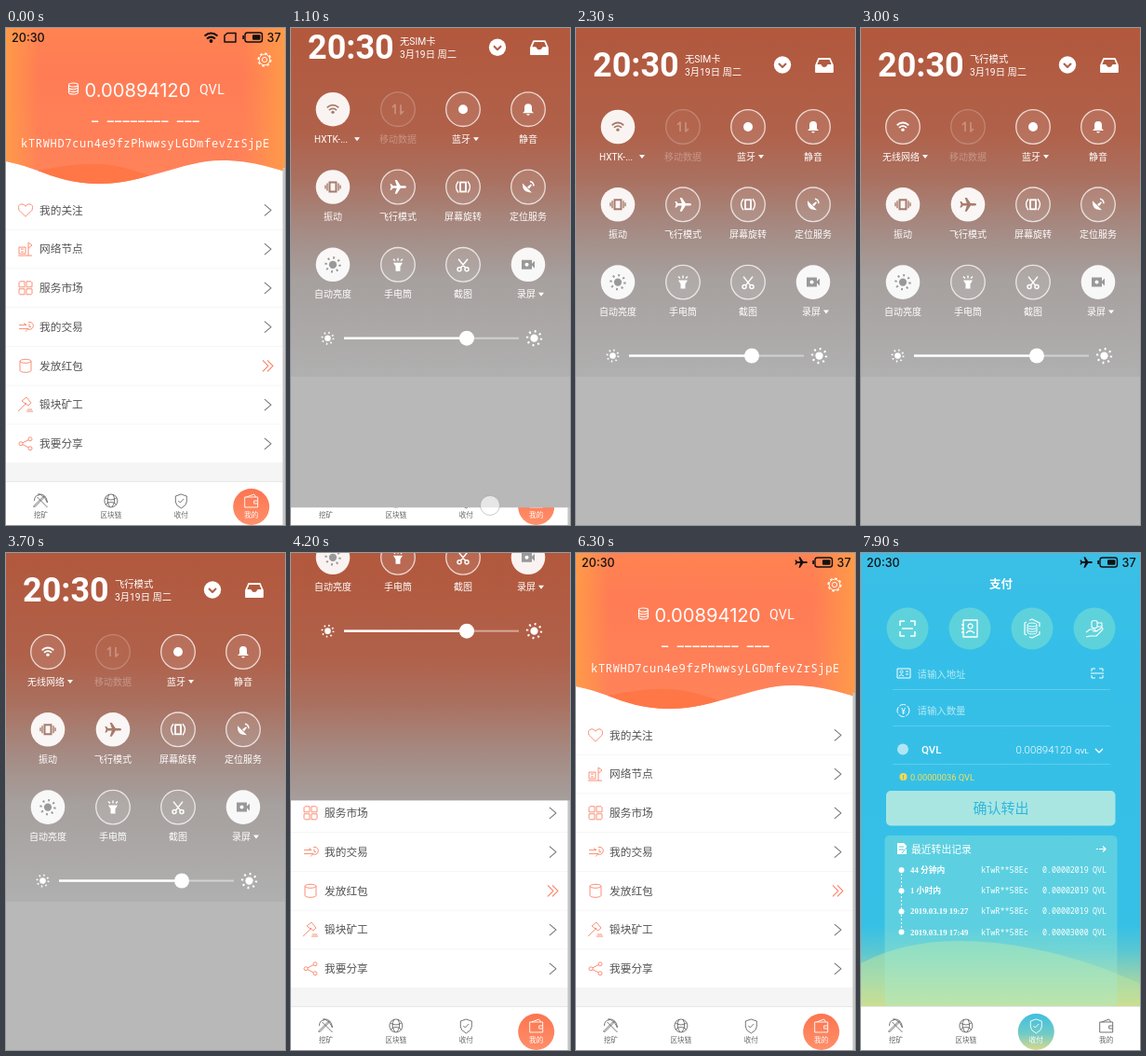
Write an HTML page that moves like this. It is 300x533 px and loops after 8 s.

```html
<!DOCTYPE html>
<html lang="zh-CN">
<head>
<meta charset="utf-8">
<style>
html, body { margin: 0; width: 100%; height: 100%; overflow: hidden; background: #fff; }
svg { display: block; width: 300px; height: 533px; font-family: Roboto, "Noto Sans CJK SC", "Noto Sans CJK", sans-serif; }
.mono { font-family: "Noto Sans Mono", "Liberation Mono", monospace; }
.serif { font-family: "Liberation Serif", "Noto Sans CJK SC", serif; }
.wide { font-family: Inter, Roboto, sans-serif; }
</style>
</head>
<body>
<svg id="stage" viewBox="0 0 300 533"></svg>
<script>
const LOOP = 8000, PLANE_ON = 2900, SHOW_PAY = 7000;
const COIN = 'QVL', ADDRESS = 'kTRWHD7cun4e9fzPhwwsyLGDmfevZrSjpE', WIFI = 'HXTK-...';

// Drawing helpers
const text = (s, x, y, size, fill = '#fff', more = '') =>
  `<text x="${x}" y="${y}" font-size="${size}" fill="${fill}" ${more}>${s}</text>`;
const middle = (s, x, y, size, fill, more = '') => text(s, x, y, size, fill, `text-anchor="middle" ${more}`);
const rect = (x, y, w, h, fill, more = '') =>
  `<rect x="${x}" y="${y}" width="${w}" height="${h}" fill="${fill}" ${more}/>`;
const circle = (x, y, r, fill, more = '') => `<circle cx="${x}" cy="${y}" r="${r}" fill="${fill}" ${more}/>`;
const line = (d, x, y, color, width = 1, more = '') =>
  `<path d="${d}" transform="translate(${x} ${y})" fill="none" stroke="${color}" stroke-width="${width}" stroke-linejoin="round" ${more}/>`;
const solid = (d, x, y, color, scale = 1) =>
  `<path d="${d}" transform="translate(${x} ${y}) scale(${scale})" fill="${color}"/>`;
const gradient = (id, stops, dir = 'x2="0" y2="1"') => `<linearGradient id="${id}" ${dir}>` +
  stops.map(([at, c]) => `<stop offset="${at}" stop-color="${c}"/>`).join('') + '</linearGradient>';

const ICON = {
  plane: 'M11 0Q11-1.6 8.5-1.6H3.5L-1.5-9H-4L-1.5-1.6H-6.5L-8.5-4H-10.5L-9 0-10.5 4H-8.5L-6.5 1.6H-1.5L-4 9H-1.5L3.5 1.6H8.5Q11 1.6 11 0Z',
  scan: 'M-6-2V-5H-2M2-5H6V-2M6 2V5H2M-2 5H-6V2M-7 0H7',
  bigScan: 'M-8-3V-8H-3M3-8H8V-3M8 3V8H3M-3 8H-8V3M-6 0H6',
  contact: 'M-7-9H8V9H-7ZM-9-4H-6M-9 0H-6M-9 4H-6M-4 5Q0 0 5 5M0.5-5a2.5 2.5 0 1 0 .1 0',
  shield: 'M0-7L6-5V1Q6 5 0 8Q-6 5-6 1V-5ZM-3 0L-1 2 3-2',
  pick: 'M-8 6L3-5L4-4L-7 7ZM-3-7Q6-8 7 2Q5-3 2-5Q0-7-3-7ZM7 7L-4-4M-7 0Q-7-6-2-6',
  globe: 'M7 0A7 7 0 1 1-7 0A7 7 0 1 1 7 0M-6-3Q0 1 6-3M-6 4Q0-1 6 4M-2-7Q-6 0-1 7M2-7Q6 0 1 7',
  wallet: 'M-7-4H7V7H-7ZM-5-4L3-7 5-4M7 0H3V3H7',
  stack: 'M-5-4A5 2 0 0 1 5-4A5 2 0 0 1-5-4V4A5 2 0 0 0 5 4V-4M-5-1.3A5 2 0 0 0 5-1.3M-5 1.4A5 2 0 0 0 5 1.4'
};

const wifi = (x, y, color, s = 1) => `<g transform="translate(${x} ${y}) scale(${s})">` +
  line('M-7-2Q0-8 7-2M-4.5 1Q0-2.8 4.5 1', 0, 0, color, 2) + circle(0, 3.5, 1.9, color) + '</g>';
const sun = (x, y, r, color) => circle(x, y, r * .55, color) +
  circle(x, y, r, 'none', `stroke="${color}" stroke-width="${r * .32}" stroke-dasharray="${r * .25} ${r * .535}"`);

function statusBar() {
  const bold = 'class="wide" font-weight="500"';
  return text('20:30', 6, 15, 12.6, '#111', bold) +
    `<g class="before">${wifi(220.5, 10.5, '#111')}${line('M-6 5V-2L-3-4.5H6V5Z', 241, 10, '#111', 1.5)}</g>` +
    `<g class="after">${solid(ICON.plane, 242, 10, '#111', .63)}</g>` +
    rect(257, 5, 18.5, 10, 'none', 'rx="2.5" stroke="#111" stroke-width="1.4"') +
    rect(265, 7.2, 8.5, 5.6, '#111', 'rx="1"') + rect(254.3, 8, 1.7, 4, '#111') +
    text('37', 280.5, 15, 12.6, '#111', bold);
}

function tabBar(active) {
  const tabs = [['pick', '挖矿'], ['globe', '区块链'], ['shield', '收付'], ['wallet', '我的']];
  return rect(0, 486, 300, 47, '#fff') + rect(0, 486, 300, .7, '#ddd') + tabs.map(([icon, label], i) => {
    const x = 37.5 + 75.4 * i, on = i === active, color = on ? '#fff' : '#666';
    return (on ? circle(x, 513.5, 19.5, `url(#tab${i})`) : '') +
      line(ICON[icon], x, 507, color, .9) + middle(label, x, 525, 7.6, color);
  }).join('');
}

function minePage() {
  const orange = '#f98468';
  const rows = [
    ['我的关注', 'M0 7L-7 0Q-9-6-4-6.5Q-1-6.5 0-4Q1-6.5 4-6.5Q9-6 7 0Z'],
    ['网络节点', 'M-7-2H0V5H-7ZM-5 0H-2M-5 3H-2M3 7V-7L7-4 3-1M-8 7H7'],
    ['服务市场', 'M-6-7H-1V-1H-7V-6ZM1-7H6L7-6V-1H1ZM-7 1H-1V7H-6L-7 6ZM1 1H7V6L6 7H1Z'],
    ['我的交易', 'M-7-2H1L-2-4M-7 2H3L0 5M3-5A4 4 0 1 1 2 2M4-3V0H6'],
    ['发放红包', 'M-6-5A6 2 0 0 1 6-5V5A6 2 0 0 1-6 5ZM-6-5A6 2 0 0 0 6-5'],
    ['锻块矿工', 'M-8 7L1-2M-4-4L1-8 6-2 3 1ZM1 7H8M2 5H7'],
    ['我要分享', 'M-3-1L3-4M-3 1L3 4M-7 0a2 2 0 1 0 4 0a2 2 0 1 0-4 0M3-5a2 2 0 1 0 4 0a2 2 0 1 0-4 0M3 5a2 2 0 1 0 4 0a2 2 0 1 0-4 0']
  ];
  const list = rows.map(([label, icon], i) => {
    const y = 195.3 + 41.75 * i, hot = i === 4;
    return line(icon, 21, y, orange, .9) + text(label, 36, y + 4.3, 11.7, '#555') +
      line(hot ? 'M-3-6L3 0-3 6M2-6L8 0 2 6' : 'M-3-6L4 0-3 6', hot ? 279 : 281, y, hot ? orange : '#777', 1.1) +
      rect(0, y + 20.5, 298, .7, '#f2f2f2');
  }).join('');
  const cog = circle(0, 0, 5.8, 'none', 'stroke="#fff" stroke-width=".9"') +
    circle(0, 0, 6.9, 'none', 'stroke="#fff" stroke-width="1.3" stroke-dasharray="2.7 2.72"') +
    circle(0, 0, 2.6, 'none', 'stroke="#fff" stroke-width=".9"');
  const wave = 'M0 0H300V154C280 148 260 142 232 142C190 142 150 167 100 167C60 167 35 150 0 143Z';
  return rect(0, 0, 300, 533, '#fff') +
    `<path d="${wave}" fill="url(#mineSky)"/><path d="${wave}" fill="url(#mineEdge)"/>` +
    '<path d="M34 153C60 148 80 145 100 146C122 147 138 153 154 158C136 164 118 167 100 167C72 167 52 160 34 153Z" fill="#ff7746"/>' +
    statusBar() + `<g transform="translate(278 34)">${cog}</g>` +
    line(ICON.stack, 72.5, 65, '#fff', 1.1) +
    text('0.00894120', 84.5, 74, 20.2, '#fff', 'class="wide"') +
    text(COIN, 208, 71, 14, '#fff', 'letter-spacing=".4"') +
    text('_ ________ ___', 92, 99, 12, '#fff', 'class="mono" letter-spacing="1.15" font-weight="600"') +
    text(ADDRESS, 16, 127.5, 12, '#fff', 'class="mono" letter-spacing=".68" font-weight="300"') +
    list + rect(0, 466, 300, 20, '#f5f5f5') + tabBar(3) + rect(297.5, 150, 2.5, 383, '#c4c4c4');
}

function payPage() {
  const pale = '#b4ebf4';
  const circles = [
    line(ICON.bigScan, 50, 81, '#fff', 1.5),
    line(ICON.contact, 117, 81, '#fff', 1.3),
    line('M-3-9L0-10 8-6V-2M8 3V6L0 10-3 9M-6 7L-8 6V-6L-6-7', 184, 81, '#fff', 1.2) + line(ICON.stack, 184, 81, '#fff', .9),
    line('M-9 4L-5 1H0L2 3H-2M2 3L8-1Q10 0 8 2L2 8H-5L-9 9M-3-2a3 1.5 0 1 0 6 0v-5a3 1.5 0 1 0-6 0zM3-2h5v-4h-5', 251, 81, '#fff', 1.1)
  ].map((icon, i) => circle(50 + 67 * i, 81, 22.5, '#86e6cf', 'fill-opacity=".5"') + icon).join('');
  const history = [
    ['44 分钟内', '0.00002019'], ['1 小时内', '0.00002019'],
    ['2019.03.19 19:27', '0.00002019'], ['2019.03.19 17:49', '0.00003000']
  ].map(([when, amount], i) => {
    const y = 340 + 22.2 * i;
    return circle(43.5, y, 3, '#fff') + text(when, 53, y + 3, 8.8, '#fff', 'class="serif" font-weight="700"') +
      text('kTwR**58Ec', 129, y + 3, 8.5, '#fff', 'class="mono" font-weight="300"') +
      text(amount, 195, y + 3, 8.3, '#fff', 'class="mono" font-weight="300"') +
      text(COIN, 249, y + 3, 8.3, '#fff', 'class="mono"');
  }).join('');
  const rule = y => rect(34, y, 234, .8, '#fff', 'fill-opacity=".25"');
  return rect(0, 0, 300, 533, 'url(#paySky)') +
    '<path d="M0 440C30 424 65 416 105 416C175 416 250 438 300 462V490H0Z" fill="url(#hill)"/>' +
    statusBar() + middle('支付', 150.5, 37.5, 12.5, '#fff', 'font-weight="700"') + circles +
    rule(146) + rule(185) + rule(226) +
    line('M-7-5H7V5H-7ZM2-2H5M2 1H5M-5 3Q-3 0 0 3M-2.5-3a1.5 1.5 0 1 0 .1 0', 46, 129, '#fff') +
    text('请输入地址', 60.5, 133.5, 10.4, pale) + line(ICON.scan, 254, 129, '#fff', 1) +
    circle(45.5, 169, 6.5, 'none', 'stroke="#fff" stroke-dasharray="7 1.5"') + middle('¥', 45.5, 172.5, 9, '#fff') +
    text('请输入数量', 60.5, 173, 10.4, pale) +
    circle(45, 210.5, 6, '#fff', 'fill-opacity=".6"') + text(COIN, 65, 214.5, 11.5, '#fff', 'font-weight="500"') +
    text('0.00894120', 166.5, 215, 11.5, '#fff', 'font-weight="300"') + text(COIN, 230, 215, 8) +
    line('M-4-2L0 2 4-2', 256, 212, '#fff', 1.3) +
    circle(45.5, 240, 4, '#f5d94f') + middle('!', 45.5, 242.5, 7, '#4bbfd0', 'font-weight="700"') +
    text('0.00000036 ' + COIN, 53, 243.5, 9.3, '#f5e05a') +
    rect(27, 255, 246.5, 37.5, '#a9e6e2', 'rx="5"') + middle('确认转出', 150.5, 278.5, 15, '#2fb6dc') +
    rect(25.5, 303, 250, 183, '#a5ecd6', 'fill-opacity=".34" rx="5"') +
    solid('M-5-6H2L5-3V6H-5Z', 44, 317, '#fff') + line('M-3-2H2M-3 1H2M0 5L5-1', 44, 317, '#58c6dc') +
    text('最近转出记录', 54, 321.5, 10.8, '#fff', 'font-weight="500"') +
    line('M-5 0H-3M-2 0H5M2-3L5 0 2 3', 258, 317.5, '#fff', 1.2) +
    line('M0 0V67', 43.5, 340, '#fff', 1, 'stroke-dasharray="2 2"') + history + tabBar(2);
}

function panelContent() {
  const dark = '#a77b6c';
  const glyphs = {
    wifi: c => wifi(0, 0, c, .9),
    data: c => line('M-3 5V-5L-6-2M3-5V5L6 2', 0, 0, c, 1.7),
    dot: c => circle(0, 0, 5, c),
    bell: c => solid('M-6 4L-4 2V-2Q-4-6 0-6Q4-6 4-2V2L6 4ZM-2 5H2Q0 8-2 5Z', 0, 0, c),
    shake: c => rect(-3.5, -5, 7, 10, 'none', `stroke="${c}" stroke-width="2"`) + line('M-6-4V4M6-4V4M-8-2V2M8-2V2', 0, 0, c, 1.4),
    plane: c => solid(ICON.plane, 0, 0, c, .82),
    rotate: c => rect(-3, -5, 6, 10, 'none', `stroke="${c}" stroke-width="1.8"`) + line('M-5-6Q-10 0-5 6M5-6Q10 0 5 6', 0, 0, c, 1.4),
    dish: c => solid('M-6-4Q-7 6 4 6ZM-1 0L3-3 4-2 1 2Z', 0, 0, c) + line('M2-6Q6-5 6-1', 0, 0, c, 1.5),
    sun: c => sun(0, 0, 7.5, c),
    torch: c => solid('M-5-2H5L2.5 2V7H-2.5V2Z', 0, 0, c) + line('M0-7V-4M-5-6L-3-4M5-6L3-4', 0, 0, c, 1.4),
    cut: c => line('M-5-6L3 4M5-6L-3 4M-6 5a2 2 0 1 0 4 0a2 2 0 1 0-4 0M2 5a2 2 0 1 0 4 0a2 2 0 1 0-4 0', 0, 0, c, 1.5),
    film: c => solid('M-7-5H4V-1L7-4V4L4 1V5H-7Z', 0, 0, c) + circle(-1.5, 0, 2, '#fff')
  };
  const tile = (col, row, glyph, label, on, arrow) => {
    const x = 45 + 70 * col, y = 106 + 83.3 * row, off = glyph === 'data';
    const tint = row === 2 ? '#999' : dark;
    return `<g transform="translate(${x} ${y})" ${off ? 'opacity=".3"' : ''}>` +
      circle(0, 0, 18.3, '#fff', on ? 'fill-opacity=".93"' : 'fill-opacity=".1" stroke="#fff" stroke-opacity=".75" stroke-width="1.3"') +
      glyphs[glyph](on ? tint : '#fff') +
      middle(label, arrow ? -2 : 0, 35.5, 10, '#fff') +
      (arrow ? solid('M-3-2H3L0 2Z', arrow, 32, '#fff') : '') + '</g>';
  };
  return text('20:30', 18, 52, 36, '#fff', 'font-weight="700"') +
    `<g class="before">${text('无SIM卡', 117, 37, 10.3)}${tile(0, 0, 'wifi', WIFI, true, 26)}${tile(1, 1, 'plane', '飞行模式', false)}</g>` +
    `<g class="after">${text('飞行模式', 117, 37, 10.3)}${tile(0, 0, 'wifi', '无线网络', false, 24)}${tile(1, 1, 'plane', '飞行模式', true)}</g>` +
    text('3月19日 周二', 117, 51, 10.3) +
    circle(222, 39.5, 9.2, '#fff') + line('M-4-2L0 2 4-2', 222, 40, '#ac604a', 2) +
    line('M-9 0L-6-7H6L9 0V7H-9ZM-9 0H-4Q-3 3 0 3Q3 3 4 0H9', 267, 40, '#fff', 1.8) +
    solid('M-9 0H-4Q-3 3 0 3Q3 3 4 0H9V7H-9Z', 267, 40, '#fff') +
    tile(1, 0, 'data', '移动数据') + tile(2, 0, 'dot', '蓝牙', false, 14) + tile(3, 0, 'bell', '静音') +
    tile(0, 1, 'shake', '振动', true) + tile(2, 1, 'rotate', '屏幕旋转') + tile(3, 1, 'dish', '定位服务') +
    tile(0, 2, 'sun', '自动亮度', true) + tile(1, 2, 'torch', '手电筒') + tile(2, 2, 'cut', '截图') +
    tile(3, 2, 'film', '录屏', true, 14) +
    sun(39.5, 351.5, 6, '#fff') + sun(261.5, 351.5, 7.5, '#fff') +
    rect(57, 350.5, 188, 2, '#fff', 'fill-opacity=".45"') + rect(57, 350.3, 132, 2.4, '#fff') + circle(189, 351.5, 8, '#fff');
}

const stage = document.getElementById('stage');
stage.innerHTML = '<defs>' +
  gradient('mineSky', [[0, '#ff8352'], [.3, '#ff7c55'], [1, '#ff835a']]) +
  gradient('mineEdge', [[0, '#ffa045cc'], [.12, '#ffa04500'], [.85, '#ffa04500'], [1, '#ffa045cc']], 'x2="1" y2="0"') +
  gradient('tab3', [[0, '#fb7550'], [1, '#ff8f6a']]) +
  gradient('tab2', [[0, '#3fbfe0'], [.55, '#70cbc7'], [1, '#d9d98c']]) +
  gradient('paySky', [[0, '#3bbfe6'], [.2, '#35bfe8'], [.75, '#36c0e6'], [.8, '#58c7d2'], [.86, '#9fd3aa'], [.915, '#d2d98c']]) +
  gradient('hill', [[0, '#80d6c0'], [.5, '#a5dbab'], [1, '#cfdf90']]) +
  gradient('shade', [[0, '#b2583d'], [.3, '#b0614a'], [.43, '#aa705f'], [.58, '#a58b84'], [.72, '#a6a09e'], [1, '#b0b0b0']]) +
  '<clipPath id="reveal"><rect id="curtain" width="300" height="0"/></clipPath></defs>' +
  `<g id="mine">${minePage()}</g><g id="pay">${payPage()}</g>` +
  `<g clip-path="url(#reveal)">${rect(0, 0, 300, 533, '#b8b8b8')}${rect(0, 0, 300, 374, 'url(#shade)')}` +
  `<g id="panel">${panelContent()}</g></g>` +
  circle(214, 0, 10.5, '#fff', 'id="finger" fill-opacity=".65" stroke="#999" stroke-opacity=".5"');

// Lower edge of the pull-down panel over time
const EDGE = [[0, 0], [500, 0], [800, 220], [1100, 514], [1200, 533], [4000, 533], [4400, 0], [LOOP, 0]];
function edgeAt(t) {
  const i = EDGE.findIndex(([at]) => at > t), [t0, y0] = EDGE[i - 1], [t1, y1] = EDGE[i];
  return y0 + (y1 - y0) * (t - t0) / (t1 - t0);
}

const $ = id => document.getElementById(id);
const show = (el, on) => el.style.display = on ? '' : 'none';
const before = document.querySelectorAll('.before'), after = document.querySelectorAll('.after');

function draw(now) {
  const t = now % LOOP, edge = edgeAt(t), plane = t >= PLANE_ON;
  show($('mine'), t < SHOW_PAY);
  show($('pay'), t >= SHOW_PAY);
  before.forEach(el => show(el, !plane));
  after.forEach(el => show(el, plane));
  $('curtain').setAttribute('height', edge);
  $('panel').setAttribute('transform', `translate(0 ${edge - 533})`);
  $('finger').setAttribute('cy', Math.min(edge, 512));
  show($('finger'), t > 500 && t < 1150);
  requestAnimationFrame(draw);
}
draw(0);
</script>
</body>
</html>
```
